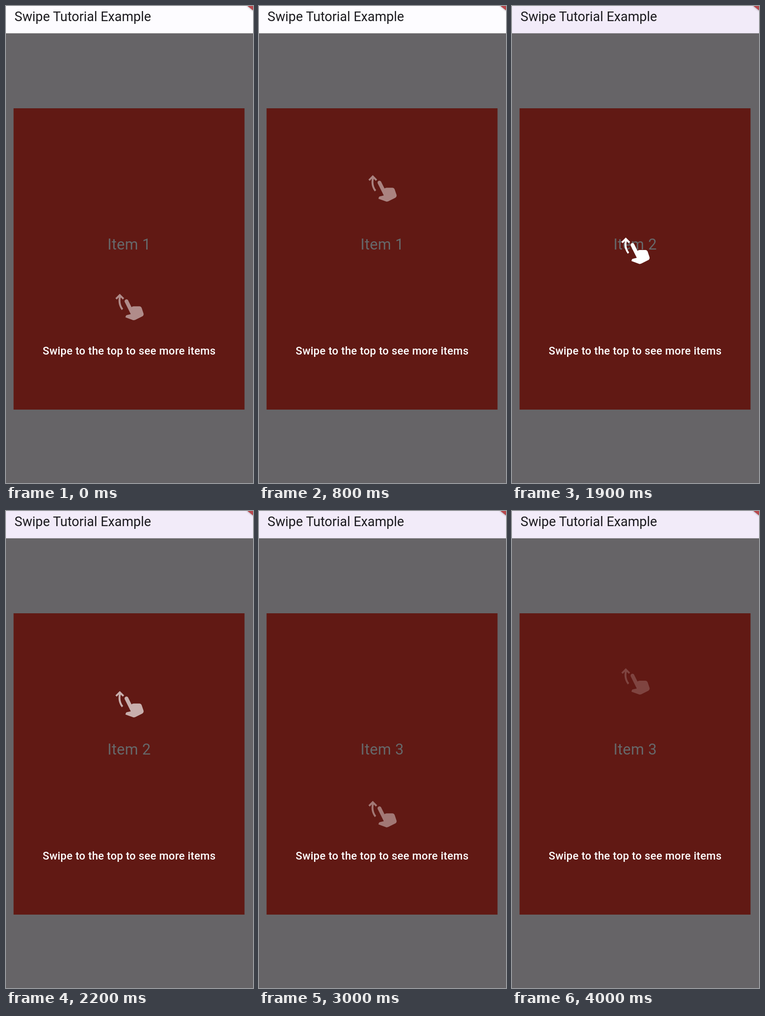
An HTML page that plays this animation: 539 by 1040 pixels, repeating every 4.1 s.

```html
<!DOCTYPE html>
<html lang="en">
<head>
<meta charset="utf-8">
<title>Swipe tutorial</title>
<style>
  html, body { margin: 0; width: 100%; height: 100%; overflow: hidden; background: #666467; }
  svg { display: block; width: 539px; height: 1040px; font-family: Roboto, sans-serif; }
  .item { font-size: 32.8px; letter-spacing: .33px; text-anchor: middle; fill: #66686a; }
  .hint { font-size: 23.6px; font-weight: 500; letter-spacing: .33px; text-anchor: middle; fill: #fff; }
</style>
</head>
<body>
<svg viewBox="0 0 539 1040">
  <defs>
    <clipPath id="card"><rect x="16.5" y="223" width="504" height="657"/></clipPath>
    <filter id="soft" x="-1" y="-1" width="3" height="3"><feGaussianBlur stdDeviation="2"/></filter>
  </defs>
  <rect width="539" height="1040" fill="#666467"/>
  <rect id="bar" width="539" height="59.5"/>
  <text x="18.5" y="32.5" font-size="28.85" fill="#1c1b1f">Swipe Tutorial Example</text>
  <path d="M525 -2H541V11Z" opacity=".5" filter="url(#soft)"/>
  <path d="M527 0H539V9.5Z" fill="#b8474c"/>
  <rect x="16.5" y="223" width="504" height="657" fill="#611914"/>
  <g clip-path="url(#card)">
    <g id="pages">
      <text class="item" x="268.75" y="530.5">Item 1</text>
      <text class="item" x="268.75" y="1187.5">Item 2</text>
      <text class="item" x="268.75" y="1844.5">Item 3</text>
    </g>
  </g>
  <path id="hand" fill="#fff" d="M2.06 5.56 1 4.5 4.5 1 8 4.5 6.94 5.56 5.32 3.94C5.11 4.76 5 5.62 5 6.5c0 2.42.82 4.65 2.2 6.43L6.13 14C4.49 11.95 3.5 9.34 3.5 6.5c0-.92.1-1.82.3-2.68ZM13.85 11.62l-2.68-5.37c-.37-.74-1.27-1.04-2.01-.67C8.41 5.96 8.11 6.86 8.48 7.6l4.81 9.6L10.05 18c-.33.09-.59.33-.7.66L9 19.78l6.19 2.25c.5.17 1.28.02 1.75-.22l5.51-2.75c.89-.45 1.32-1.48 1-2.43l-1.43-4.27c-.27-.82-1.04-1.37-1.9-1.37h-4.56c-.31 0-.62.07-.89.21Z"/>
  <text class="hint" x="268.75" y="760">Swipe to the top to see more items</text>
</svg>
<script>
const LOOP = 4100, STEP = 100;
const PAGE = 657, SETTLE = 110, SWIPES = [1086, 2253];
const HAND_STARTS = [-192, 1298, 2842], HAND_TIME = 1280;
const HAND_X = 236, HAND_TOP = 638.5, HAND_TRAVEL = 304;

const [bar, pages, hand] = ['bar', 'pages', 'hand'].map(id => document.getElementById(id));
const clamp = v => Math.min(1, Math.max(0, v));

// cubic-bezier(.42, 0, .58, 1)
function easeInOut(x) {
  let lo = 0, hi = 1;
  for (let i = 0; i < 24; i++) {
    const s = (lo + hi) / 2, r = 1 - s;
    if (1.26 * r * r * s + 1.74 * r * s * s + s * s * s < x) lo = s; else hi = s;
  }
  return lo * lo * (3 - 2 * lo);
}

function mix(a, b, k) {
  return `rgb(${a.map((v, i) => Math.round(v + (b[i] - v) * k))})`;
}

function draw(t) {
  const scroll = SWIPES.reduce((sum, s) => sum + (t > s ? PAGE * (1 - Math.exp((s - t) / SETTLE)) : 0), 0);
  pages.setAttribute('transform', `translate(0 ${-scroll})`);
  bar.setAttribute('fill', mix([253, 252, 255], [242, 235, 249], clamp((t - SWIPES[0]) / 200)));

  const start = HAND_STARTS.filter(s => s <= t).pop();
  const x = (t - start) / HAND_TIME;
  const y = HAND_TOP - HAND_TRAVEL * easeInOut(clamp(x));
  hand.setAttribute('transform', `translate(${HAND_X} ${y}) scale(2.731)`);
  hand.setAttribute('opacity', Math.min(clamp(x / .3), clamp((1.14 - x) / .54) ** 2));
}

const begin = performance.now();
function tick() {
  const t = (performance.now() - begin) % LOOP;
  draw(Math.floor(t / STEP) * STEP);
  requestAnimationFrame(tick);
}
tick();
</script>
</body>
</html>
```
